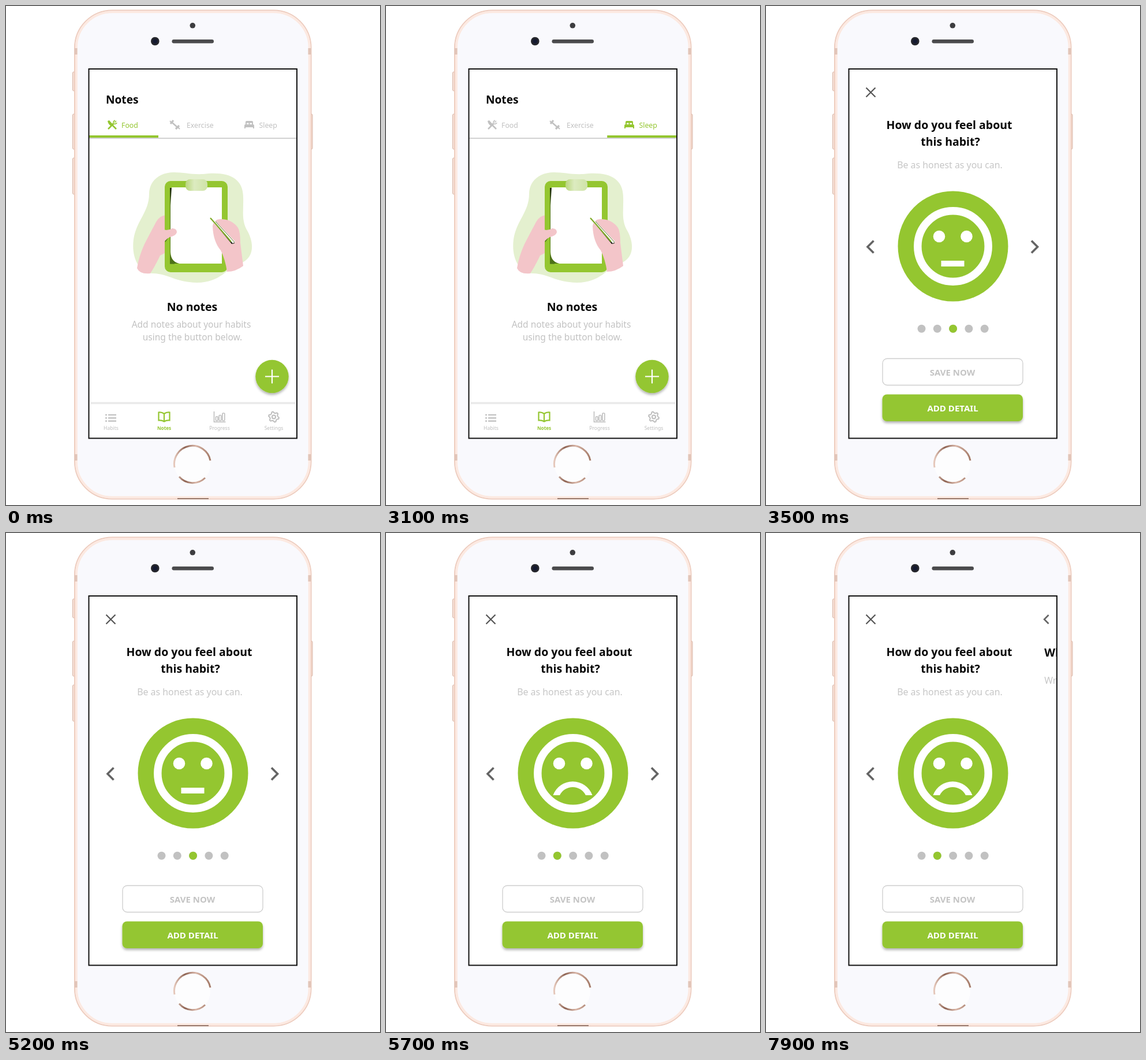
An HTML page for the animation above (8000 ms loop, 648 by 864 pixels).

```html
<!DOCTYPE html>
<html lang="en">
<head>
<meta charset="utf-8">
<title>Habit notes</title>
<style>
  html, body { margin: 0; width: 100%; height: 100%; overflow: hidden; background: #fff; }
  svg { display: block; width: 100vw; height: 100vh; font-family: "Noto Sans", "Open Sans", sans-serif; }
  .green { fill: #94c630; }
  .title { font-size: 19.5px; font-weight: 700; fill: #060606; }
  .hint { font-size: 15.5px; fill: #c2c2c2; }
  .soft { font-size: 15.9px; fill: #c6c6c6; }
  .button { font-size: 15px; font-weight: 700; }
  .mid { text-anchor: middle; }
  .line { fill: none; stroke: currentColor; }
  .tab { color: #c1c1c1; font-size: 12.3px; }
  .tab.on { color: #94c630; }
  .tab text, .solid { fill: currentColor; }
  .nav { color: #bebebe; font-size: 8.6px; }
  .nav.on { color: #94c630; font-size: 8.2px; font-weight: 700; }
  .nav text { fill: currentColor; text-anchor: middle; }
  .arrow { fill: none; stroke: #646464; stroke-width: 3.6; }
</style>
</head>
<body>
<svg viewBox="0 0 648 864">
  <defs>
    <clipPath id="screenClip"><rect x="144" y="109" width="359" height="639"/></clipPath>
    <clipPath id="faceClip"><rect x="228" y="320" width="192" height="192"/></clipPath>
    <linearGradient id="metal">
      <stop offset="0" stop-color="#e7cabd"/><stop offset=".3" stop-color="#8e6353"/>
      <stop offset=".6" stop-color="#d8b5a6"/><stop offset="1" stop-color="#a57b69"/>
    </linearGradient>
    <linearGradient id="clipShade" x2="1">
      <stop stop-color="#b9d67c"/><stop offset=".4" stop-color="#dcebc0"/><stop offset="1" stop-color="#cfe3a8"/>
    </linearGradient>
    <linearGradient id="paperShade" x2="0" y2="1">
      <stop stop-color="#18230a"/><stop offset=".25" stop-color="#4f7219"/><stop offset="1" stop-color="#648f1d"/>
    </linearGradient>
    <filter id="shadow" x="-30%" y="-30%" width="160%" height="170%">
      <feDropShadow dx="0" dy="3" stdDeviation="2" flood-opacity=".3"/>
    </filter>
    <g id="face" fill="#fff">
      <circle cx="324" cy="416" r="61.2" fill="none" stroke="#fff" stroke-width="13.5"/>
      <circle cx="300" cy="399" r="10.3"/><circle cx="347.5" cy="399" r="10.3"/>
    </g>
  </defs>
  <rect width="648" height="864" fill="#fff"/>

  <!-- Phone -->
  <g fill="#f6e0d7" stroke="#d9b5a6">
    <rect x="115.5" y="114" width="5" height="33" rx="2"/>
    <rect x="115.5" y="187" width="5" height="61" rx="2"/>
    <rect x="115.5" y="263" width="5" height="63" rx="2"/>
    <rect x="526" y="187" width="5" height="61" rx="2"/>
  </g>
  <rect x="119" y="7.5" width="409.5" height="846" rx="65" fill="#f9f9fd" stroke="#eccabc" stroke-width="2"/>
  <rect x="121.8" y="10.3" width="404" height="840.4" rx="62" fill="none" stroke="#fce9e1" stroke-width="4"/>
  <path d="M121 73v11M526 73v11M121 776v11M526 776v11" stroke="#e2c5b9" stroke-width="5"/>
  <path d="M297 853h54" stroke="#98796c" stroke-width="2"/>
  <circle cx="323.3" cy="33.8" r="4.8" fill="#3d3d40"/>
  <circle cx="258.3" cy="61" r="7.3" fill="#25262c"/><circle cx="258.3" cy="61" r="4" fill="#151a31"/>
  <rect x="287.5" y="58" width="72.5" height="6.4" rx="3.2" fill="#4b4b4d"/>
  <circle cx="323" cy="795" r="31" fill="#fdfdfe"/>
  <path d="M292 799A31 31 0 0 1 354 787M300 815A31 31 0 0 0 345 817" fill="none" stroke="url(#metal)" stroke-width="3"/>

  <g clip-path="url(#screenClip)">
    <rect x="143" y="108" width="361" height="641" fill="#fff"/>

    <!-- Notes -->
    <text class="title" x="173" y="169" style="font-size:19.1px">Notes</text>
    <g class="tab">
      <path class="line" stroke-width="2.6" d="M181 203l10 10M177 213l9-9"/>
      <path class="solid" d="M176 199l3-1 6 7-3 3q-5-3-6-9z"/>
      <path class="line" stroke-width="1.5" d="M184 206l3-2q4 1 5-2M184 206l2-4q0-3 3-4M188 202l3-3"/>
      <text x="200" y="210.5">Food</text>
    </g>
    <g class="tab">
      <path class="line" stroke-width="2.4" d="M288 202l9 8"/>
      <path class="line" stroke-width="3.2" d="M285 204l5-6M294 213l6-6"/>
      <path class="line" stroke-width="2" d="M284 199l3 3M298 210l3 3"/>
      <text x="313" y="210.5">Exercise</text>
    </g>
    <g class="tab">
      <path class="solid" d="M415 205v-4q0-2 2-2h9q2 0 2 2v4q2 0 2 2v5h-2v-2h-13v2h-2v-5q0-2 2-2z"/>
      <path d="M417 205v-2.500h3.500v2.500zM422.500 205v-2.500h3.500v2.500z" fill="#fff"/>
      <text x="438.500" y="210.500">Sleep</text>
    </g>
    <path d="M144 229h360" stroke="#d2d2d2" stroke-width="2.2"/>
    <rect id="underline" class="green" x="144" y="224" width="120" height="4"/>

    <path fill="#e4f0cf" d="M248 325C248 303 266 288 291 288C309 288 320 292 342 291C382 286 411 296 411 331C412 352 407 370 418 389C430 410 431 437 405 446C383 453 372 479 331 479C292 478 283 464 255 463C229 462 217 434 221 404C226 371 248 357 248 325z"/>
    <path fill="#f3c5c9" d="M227 454Q230 434 240 412L260 374Q267 361 281 362V425L267 432Q258 451 250 463Q232 465 227 454z"/>
    <rect class="green" x="275" y="303" width="109" height="158" rx="10"/>
    <path fill="url(#paperShade)" d="M284 315h8v132h-8z"/>
    <path fill="#fff" d="M287 314h87v132H300Q286 444 285 426V345z"/>
    <path fill="#4d7118" d="M284 428Q287 443 300 446H284zM275 402l9-5-8 12z"/>
    <rect x="311" y="300" width="38" height="20" rx="8" fill="url(#clipShade)"/>
    <path fill="#f3c5c9" d="M268 385Q278 391 288 385Q296 385 296 392Q294 398 284 400Q274 405 268 418z"/>
    <path fill="#f3c5c9" d="M358 381Q360 368 374 369Q392 370 402 384Q406 391 406 410L411 450Q398 460 383 460Q380 439 372 423Q359 408 358 381z"/>
    <path fill="#16190f" d="M368 384l23 28 5-1-7-11z"/>
    <path fill="#fff" d="M354 367l9 5 34 36-4 3-31-33z"/>
    <path d="M354 367l9 10 27 31" fill="none" stroke="#80ac29" stroke-width="2.2"/>
    <path d="M363 373l33 36" stroke="#59782a" stroke-width="1"/>

    <text class="title mid" x="322.500" y="528">No notes</text>
    <text class="hint mid" x="321" y="556.500">Add notes about your habits</text>
    <text class="hint mid" x="323" y="578.500">using the button below.</text>
    <circle class="green" cx="461" cy="641.500" r="28.700" filter="url(#shadow)"/>
    <path d="M461 629.500v24M449 641.500h24" stroke="#fff" stroke-width="2.200"/>

    <path d="M147 687.500h354" stroke="#eaeaea" stroke-width="3.500"/>
    <g class="nav">
      <path class="line" stroke-width="2.200" d="M172 708h3m2 0h14M172 713.300h3m2 0h14M172 718.600h3m2 0h14"/>
      <text x="182" y="734">Habits</text>
    </g>
    <g class="nav on">
      <path class="line" stroke-width="2.200" d="M274 706q-4-3-9.500-2.500v14q6-.5 9.500 2q3.500-2.500 9.500-2v-14Q278 703 274 706v13"/>
      <text x="274" y="734">Notes</text>
    </g>
    <g class="nav">
      <path class="line" stroke-width="1.600" d="M360.500 702v18.200h20"/>
      <g class="line" stroke-width="1.600">
        <rect x="363.500" y="711" width="3.600" height="7" rx="1"/><rect x="369.200" y="708.500" width="3.600" height="9.500" rx="1"/><rect x="375" y="705" width="3.800" height="13" rx="1"/>
      </g>
      <text x="370" y="734">Progress</text>
    </g>
    <g class="nav">
      <path id="gear" class="line" stroke-width="2" stroke-linejoin="round"/>
      <circle class="line" cx="464" cy="711.500" r="3" stroke-width="2"/>
      <text x="464" y="734">Settings</text>
    </g>

    <!-- Feeling -->
    <g id="feeling">
      <rect x="143" y="108" width="361" height="641" fill="#fff"/>
      <path d="M173.500 141.500l16 16m0-16l-16 16" stroke="#555" stroke-width="2.200"/>
      <text class="title mid" x="317.500" y="213">How do you feel about</text>
      <text class="title mid" x="319.500" y="242">this habit?</text>
      <text class="soft mid" x="318.500" y="281">Be as honest as you can.</text>
      <path class="arrow" d="M186.500 406.500L176 417l10.500 10.500M460 406.500L470.500 417 460 427.500"/>
      <circle class="green neutral" cx="324" cy="416" r="95.500"/>
      <circle class="green sad" cx="324" cy="416" r="95.500"/>
      <g clip-path="url(#faceClip)">
        <g class="neutral"><use href="#face"/><path fill="#fff" d="M303.500 441h40v10h-40z"/></g>
        <g class="sad"><use href="#face"/><path fill="#fff" d="M289.500 454A36.200 36.200 0 0 1 357.500 454H346A25 25 0 0 0 301 454z"/></g>
      </g>
      <g id="dots"></g>
      <rect x="202" y="610.500" width="243" height="46" rx="8" fill="#fff" stroke="#cdcdcd" stroke-width="1.300"/>
      <text class="button mid" x="323" y="639.500" fill="#c4c4c4">SAVE NOW</text>
      <rect class="green" x="201.500" y="672.500" width="243.500" height="46.500" rx="8" filter="url(#shadow)"/>
      <text class="button mid" x="323.500" y="701.500" fill="#fff">ADD DETAIL</text>
    </g>

    <!-- Detail -->
    <g id="detail">
      <rect x="144" y="108" width="361" height="641" fill="#fff"/>
      <path class="arrow" style="stroke-width:2.600" d="M180.500 142l-7.500 7.500 7.500 7.500"/>
      <text class="title" x="173" y="213.500">What happened?</text>
      <text class="soft" x="173" y="261">Write a few words.</text>
    </g>
  </g>
  <rect x="143.500" y="109" width="360.500" height="639.500" fill="none" stroke="#111" stroke-width="2"/>
</svg>
<script>
  const LOOP = 8000, STEP = 100, SLIDE = 300;
  const PAGE_WIDTH = 360, PAGE_HEIGHT = 640;
  const $ = id => document.getElementById(id);
  const all = selector => [...document.querySelectorAll(selector)];
  const tabs = all('.tab');

  // Ease-out progress of a slide that begins at the given time
  const slide = (time, start) => {
    const x = Math.min(1, Math.max(0, (time - start) / SLIDE));
    return 1 - (1 - x) ** 2;
  };
  const move = (element, x, y = 0) => element.setAttribute('transform', `translate(${x} ${y})`);

  $('dots').innerHTML = [0, 1, 2, 3, 4].map(i => {
    const dot = `cx="${269.5 + 27.3 * i}" cy="558.7" r="7"`;
    return `<circle ${dot} fill="#c1c1c1"/><circle ${dot} class="green lit"/>`;
  }).join('');
  const lit = all('.lit');

  const gearPoints = Array.from({ length: 24 }, (_, i) => {
    const angle = (i + 0.5) * Math.PI / 12;
    const radius = i % 4 < 2 ? 9 : 6.8;
    return [464 + radius * Math.cos(angle), 711.5 + radius * Math.sin(angle)];
  });
  $('gear').setAttribute('d', `M${gearPoints.join('L')}z`);

  function draw(now) {
    const time = Math.floor(now % LOOP / STEP) * STEP;

    const active = time < 1000 ? 0 : time < 1700 ? 1 : 2;
    tabs.forEach((tab, i) => tab.classList.toggle('on', i === active));
    $('underline').setAttribute('x', 144 + 119.6 * active);

    move($('feeling'), 0, PAGE_HEIGHT * (1 - slide(time, 3150)));

    const turn = slide(time, 5385);
    all('.neutral').forEach(part => move(part, PAGE_WIDTH * turn));
    all('.sad').forEach(part => move(part, PAGE_WIDTH * (turn - 1)));
    lit.forEach((dot, i) => dot.setAttribute('opacity', i === 1 ? turn : i === 2 ? 1 - turn : 0));

    move($('detail'), PAGE_WIDTH * (1 - slide(time, 7878)));
    requestAnimationFrame(draw);
  }
  draw(performance.now());
</script>
</body>
</html>
```
